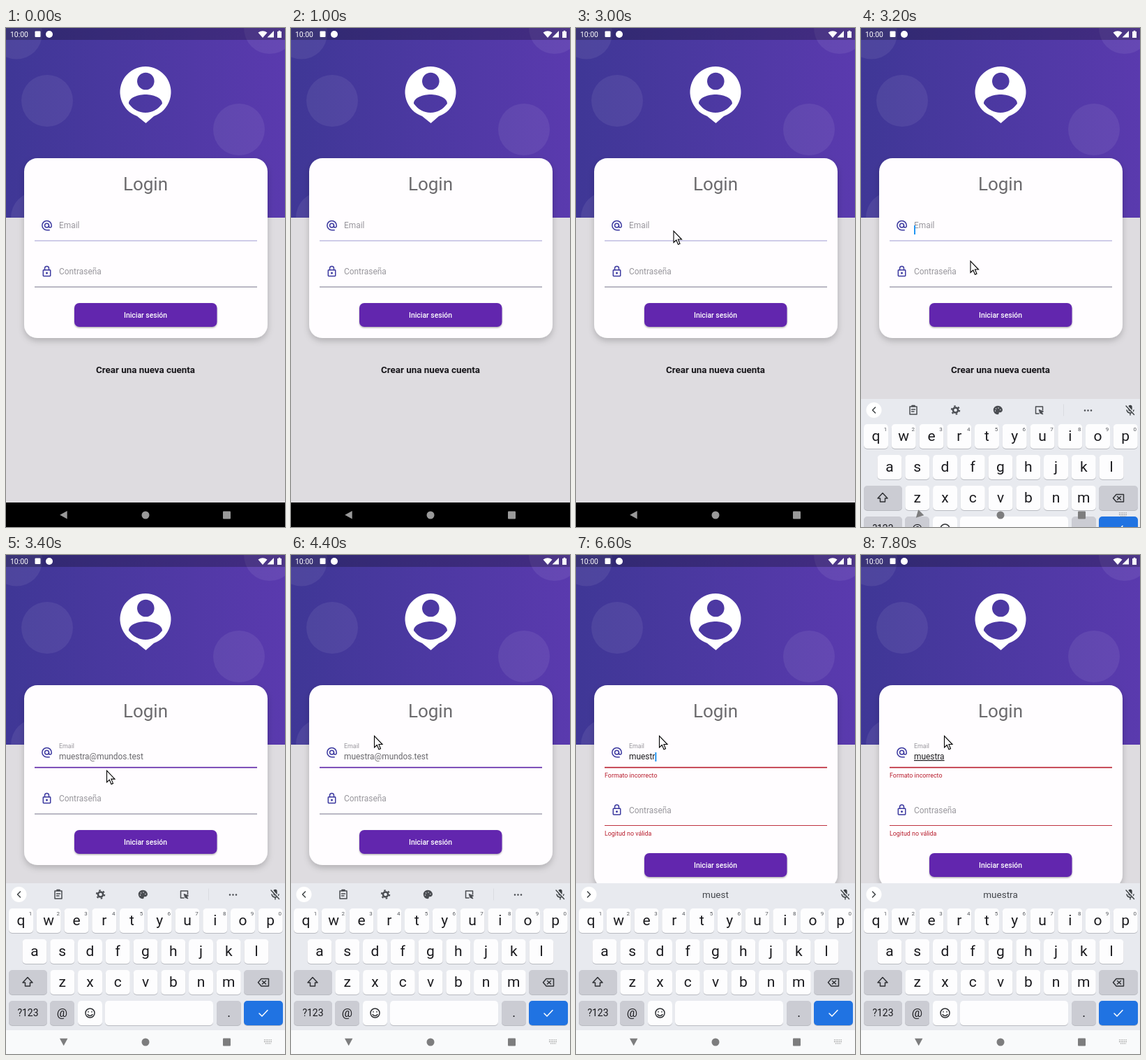
An HTML page that plays this animation: 400 px wide and 713 px high, repeating every 8 s.

```html
<!DOCTYPE html>
<html lang="es">
<head>
<meta charset="utf-8">
<title>Login</title>
<style>
  html, body { margin: 0; width: 100%; height: 100%; overflow: hidden; background: #dedce0; }
  svg { display: block; width: 100%; height: 100%; font-family: Roboto, sans-serif; }
  .mid { text-anchor: middle; }
  .field { font-size: 11.9px; }
  .label { fill: #98969c; }
  .error { font-size: 8.9px; fill: #b71c2c; }
  .line { fill: none; stroke-linecap: round; stroke-linejoin: round; }
  .key { font-size: 21px; fill: #1b1b1f; }
  .digit { font-size: 8px; fill: #55585d; }
</style>
</head>
<body>
<svg viewBox="0 0 400 713" preserveAspectRatio="none">
  <defs>
    <linearGradient id="purple">
      <stop stop-color="#3f3796"/><stop offset="1" stop-color="#5a3aae"/>
    </linearGradient>
    <clipPath id="headerClip"><path d="M0 0H400V271H0Z"/></clipPath>
    <filter id="cardShadow" x="-10%" y="-10%" width="120%" height="125%">
      <feDropShadow dx="0" dy="4" stdDeviation="5" flood-opacity=".2"/>
    </filter>
    <filter id="buttonShadow" x="-5%" y="-10%" width="110%" height="140%">
      <feDropShadow dx="0" dy="1.2" stdDeviation="1" flood-opacity=".35"/>
    </filter>
  </defs>

  <rect width="400" height="713" fill="#dedce0"/>
  <g clip-path="url(#headerClip)">
    <rect width="400" height="271" fill="url(#purple)"/>
    <g id="bubbles" fill="#fff" fill-opacity=".07"></g>
  </g>
  <path fill="#fff" fill-rule="evenodd" d="M188 126A36.5 36.5 0 1 1 212 126L200.500 136ZM188 76a12.300 12.300 0 1 0 24.600 0a12.300 12.300 0 1 0-24.600 0ZM176 108C176 99 190 95 200 95S224 99 224 108C218 116 210 121 200 121S182 116 176 108Z"/>

  <rect width="400" height="17" fill-opacity=".25"/>
  <g fill="#fff">
    <text x="6" y="13" font-size="10.4">10:00</text>
    <rect x="41.500" y="4.500" width="8" height="8.500" rx="1"/>
    <circle cx="62" cy="9" r="5"/>
    <path d="M361.500 6.500Q368 1.800 374.500 6.500L368 14ZM384 4V13.500H374.500ZM389 5H390.700V3.700H393.300V5H395V14H389Z"/>
  </g>

  <rect id="card" x="26" y="186" width="349" height="257" rx="19" fill="#fffdff" filter="url(#cardShadow)"/>
  <text class="mid" x="200" y="232" font-size="26" fill="#6c6b6e">Login</text>

  <g class="line" transform="translate(49.600 273.200) scale(.743)" stroke="#3b389f" stroke-width="2">
    <circle cx="12" cy="12" r="4"/>
    <path d="M16 12v1.400a2.500 2.500 0 0 0 5 0V12a9 9 0 1 0-9 9h5"/>
  </g>
  <text id="emailLabel" class="label" x="76">Email</text>
  <text id="hint" class="field" x="76" y="292" fill="#69686c">muestra@mundos.test</text>
  <text id="typed" class="field" x="76" y="292" fill="#1d1c1f"></text>
  <rect id="caret" y="282" width="2" height="13" fill="#2196f3"/>
  <rect id="emailLine" x="41" width="319"/>
  <text class="error" x="41" y="318">Formato incorrecto</text>

  <g id="password">
    <g class="line" transform="translate(49.600 339) scale(.743)" stroke="#3b389f" stroke-width="2">
      <rect x="5" y="9" width="14" height="12" rx="1"/>
      <path d="M8 9V6a4 4 0 0 1 8 0V9"/>
      <circle cx="12" cy="15" r="1"/>
    </g>
    <text class="field label" x="76" y="352">Contraseña</text>
    <rect id="passwordLine" x="41" y="369.500" width="319" height="1"/>
    <text class="error" x="41" y="384">Logitud no válida</text>
  </g>

  <g id="button">
    <rect x="98" y="393" width="204.500" height="34" rx="7" fill="#6228ae" filter="url(#buttonShadow)"/>
    <text class="mid" x="200" y="414" font-size="10.4" font-weight="500" fill="#fff">Iniciar sesión</text>
  </g>
  <text id="create" class="mid" x="200" y="493" font-size="13.4" font-weight="700" fill="#17161a">Crear una nueva cuenta</text>

  <rect y="678" width="400" height="35"/>
  <g id="keyboard">
    <rect y="469" width="400" height="244" fill="#e8eaef"/>
    <rect y="679" width="400" height="34" fill="#f9fafb"/>
    <g id="keys"></g>
    <g class="line" stroke="#303236" stroke-width="1.500">
      <path d="M31 603.500L38 611H34.500V616H27.500V611H24ZM366 605.500H376.500V616H366L361.500 610.700ZM367.500 608.500L372.500 613M372.500 608.500L367.500 613"/>
      <circle cx="120.500" cy="654.500" r="6.500"/>
      <path d="M118 652.500V653M123 652.500V653M117 656.500Q120.500 660.500 124 656.500"/>
      <path stroke="#fff" d="M363 655L367 659L375 650.500"/>
    </g>
    <circle cx="18.500" cy="485" r="11" fill="#fff"/>
    <path id="chevron" class="line" d="M-2-4L2 0L-2 4" stroke="#3c4043" stroke-width="1.500"/>
    <g id="tools" class="line" stroke="#4a4d52" stroke-width="1.500">
      <path d="M70 480H80V491H70ZM73 480V478.500H77V480M72.500 484H77.500M72.500 487H76"/>
      <circle cx="135.500" cy="485" r="3.600" stroke-width="2.500"/>
      <circle cx="135.500" cy="485" r="5.700" stroke-dasharray="2.500 3.470" stroke-linecap="butt" stroke-width="2"/>
      <path fill="#4a4d52" d="M196 479.500a5.500 5.500 0 1 0 0 11c2 0 0-3 2-3h2.500c4-3 0-8-4.500-8Z"/>
      <path stroke="#e8eaef" d="M192.500 486V486M193.500 483V483M197 482V482M199.800 484.500V484.500"/>
      <path d="M255 490H250.500V480H260.500V485"/>
      <path fill="#4a4d52" d="M255.500 484.500L261.500 487L259 488L261 491L257 489.500Z" stroke-width="1"/>
      <path d="M290.500 477V493" stroke="#d9dbe0" stroke-width="1"/>
      <path d="M321 485.500V485.500M325.500 485.500V485.500M330 485.500V485.500" stroke-width="2.600"/>
    </g>
    <text id="suggestion" class="mid" x="200" y="490" font-size="13.500" fill="#44474c"></text>
    <g class="line" stroke="#3c4043" stroke-width="1.400">
      <rect x="384" y="478.500" width="4" height="7.500" rx="2" fill="#3c4043"/>
      <path d="M381 485Q382 489 386 489T391 485M386 489V492"/>
      <path d="M380.500 478.500L392 491" stroke="#e8eaef" stroke-width="3"/>
      <path d="M380 479L391.500 491.500"/>
    </g>
  </g>

  <g id="nav">
    <path id="back" d="M-5.500 0L5-5.700V5.700Z"/>
    <circle cx="200" cy="696" r="5.500"/>
    <rect x="311" y="690.500" width="11" height="11" rx="1"/>
  </g>
  <path id="keyboardIcon" d="M370 693H382M370 695.500H382M372 698H380" stroke="#777" stroke-width="1.200" stroke-dasharray="1.200 1.200"/>
  <path id="pointer" d="M0 0V16.500L3.800 13L6.500 19.300L9 18.200L6.400 12H11.500Z" fill="#fff" stroke="#000" stroke-width="1.100"/>
</svg>

<script>
const LOOP = 8000, STEP = 200, WORD = "muestra";
const $ = id => document.getElementById(id);
const set = (el, attrs) => { for (const k in attrs) el.setAttribute(k, attrs[k]); };
const add = (parent, tag, attrs, text = "") => {
  const el = document.createElementNS("http://www.w3.org/2000/svg", tag);
  set(el, attrs);
  el.textContent = text;
  parent.append(el);
};
const show = (el, on) => el.style.display = on ? "" : "none";
const lerp = (a, b, p) => a + (b - a) * p;
const ramp = (t, start, end) => Math.max(0, Math.min(1, (t - start) / (end - start)));

for (const [cx, cy] of [[59, 104], [15, 7.5], [378, 0], [44, 271], [334, 145]])
  add($("bubbles"), "circle", { cx, cy, r: 37 });

function addKey(x, y, width, label = "", fill = "#fdfdfe", size = 21) {
  const box = { x, width, height: 35, rx: 5 };
  add($("keys"), "rect", { ...box, y: y + 1, fill: "#b9bbc1" });
  add($("keys"), "rect", { ...box, y, fill });
  add($("keys"), "text", { class: "key mid", x: x + width / 2, y: y + 17 + size / 3, style: `font-size:${size}px` }, label);
}
const PITCH = 39.75, GREY = "#cbccd3";
[["qwertyuiop", 4, 505], ["asdfghjkl", 23.5, 549], ["zxcvbnm", 63.3, 593]].forEach(([row, left, y], r) =>
  [...row].forEach((letter, i) => {
    const x = left + i * PITCH;
    addKey(x, y, 35, letter);
    if (r === 0) add($("keys"), "text", { class: "digit mid", x: x + 31, y: y + 10 }, (i + 1) % 10);
  }));
addKey(4, 593, 55, "", GREY);
addKey(341, 593, 56, "", GREY);
addKey(4, 637, 55, "?123", GREY, 14);
addKey(63, 637, 35, "@", GREY, 17);
addKey(103, 637, 35);
addKey(142, 637, 155);
addKey(302, 637, 35, ".", GREY, 18);
addKey(341, 637, 56, "", "#2073e2");

// Pointer stops: time, x, y
const PATH = [[1600, 400, 160], [2200, 127, 234], [2800, 130, 284], [3000, 140, 290], [3200, 157, 333], [3800, 119.5, 258.5]];
function pointerAt(t) {
  const next = PATH.findIndex(stop => stop[0] > t);
  if (next < 0) return PATH.at(-1).slice(1);
  if (next === 0) return null;
  const [a, b] = [PATH[next - 1], PATH[next]];
  const p = ramp(t, a[0], b[0]);
  return [lerp(a[1], b[1], p), lerp(a[2], b[2], p)];
}

const lettersAt = t => t < 5800 ? 0 : Math.min(WORD.length, Math.floor((t - 5800) / 160) + 1);

function draw(t) {
  const letters = lettersAt(t), suggested = lettersAt(t - 80);
  const typing = letters > 0, focused = t > 3200;
  const float = ramp(t, 3200, 3400), slide = ramp(t, 3000, 3400);
  const shift = typing ? 16.5 : 0;

  set($("emailLabel"), { y: lerp(286, 276, float), "font-size": lerp(11.9, 8.9, float) });
  $("hint").style.opacity = typing ? 0 : float;
  $("typed").textContent = WORD.slice(0, letters);
  $("typed").style.textDecoration = typing && letters === suggested ? "underline" : "none";
  set($("caret"), { x: 76 + (typing ? $("typed").getComputedTextLength() : 0) });
  const blinkStart = typing ? 6850 : 2900;
  show($("caret"), t >= 3100 && (t < blinkStart || (t - blinkStart) % 1000 < 500));

  set($("emailLine"), focused
    ? { y: 302.8, height: 1.6, fill: typing ? "#b71c2c" : "#5a1fa5" }
    : { y: 303.5, height: 1, fill: "#a09cd2" });
  set($("passwordLine"), { fill: typing ? "#bf3341" : "#77758a" });
  document.querySelectorAll(".error").forEach(el => show(el, typing));
  set($("password"), { transform: `translate(0 ${shift})` });
  set($("button"), { transform: `translate(0 ${shift * 2})` });
  set($("create"), { transform: `translate(0 ${shift * 2})` });
  set($("card"), { height: 257 + shift * 2 });

  show($("keyboard"), slide > 0);
  set($("keyboard"), { transform: `translate(0 ${244 * (1 - slide) ** 2})` });
  show($("tools"), !typing);
  set($("chevron"), { transform: `translate(18.5 485) scale(${typing ? 1 : -1} 1)` });
  $("suggestion").textContent = WORD.slice(0, suggested);
  set($("nav"), { fill: slide > 0 ? "#7d7d7e" : "#9a9a9a" });
  set($("back"), { transform: `translate(82.7 695.8) rotate(${-90 * slide})` });
  show($("keyboardIcon"), slide > 0);

  const pointer = pointerAt(t);
  show($("pointer"), pointer);
  if (pointer) set($("pointer"), { transform: `translate(${pointer})` });
}

const start = performance.now();
function frame() {
  const t = (performance.now() - start) % LOOP;
  draw(Math.floor(t / STEP) * STEP);
  requestAnimationFrame(frame);
}
frame();
</script>
</body>
</html>
```
